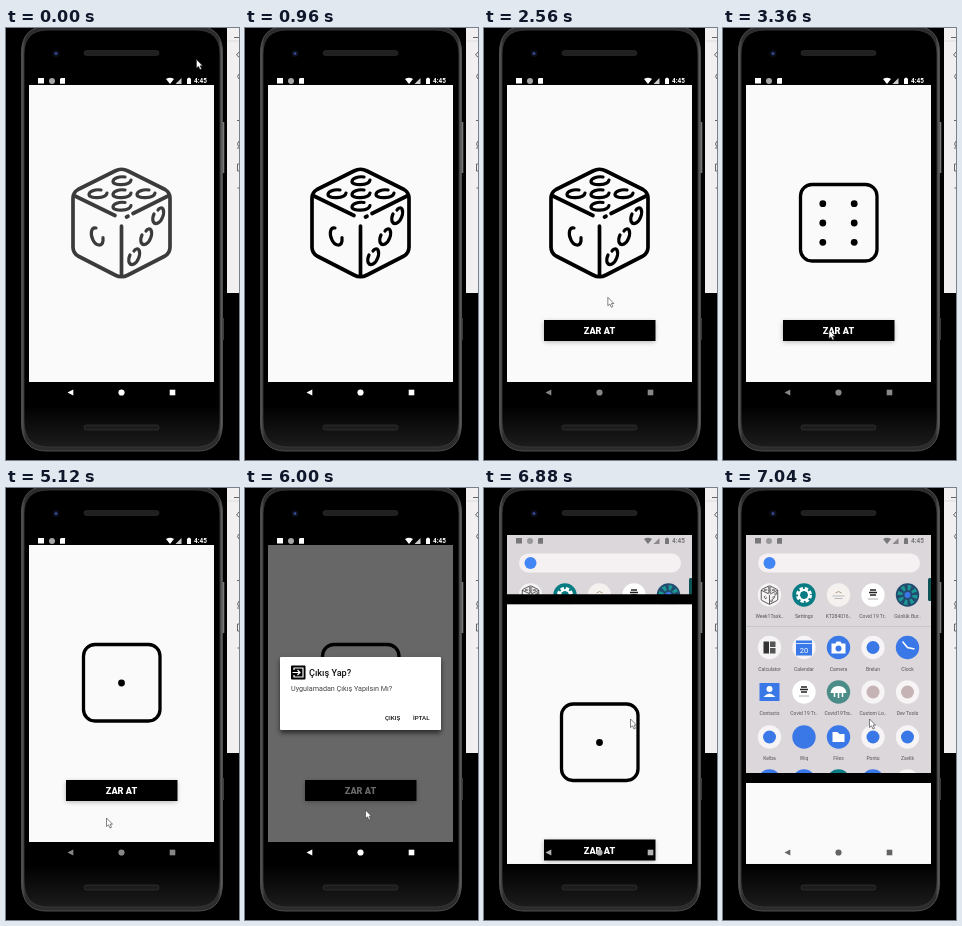
These frames come from a looping animation (233 px wide and 432 px high, 7120 ms). An HTML page:

```html
<!DOCTYPE html>
<html lang="tr">
<head>
<meta charset="utf-8">
<style>
html, body { margin: 0; width: 100%; height: 100%; overflow: hidden; background: #000; }
svg { display: block; width: 100%; height: 100%; font-family: Roboto, sans-serif; }
</style>
</head>
<body>
<svg viewBox="0 0 233 432">
  <defs>
    <clipPath id="screen"><rect x="23" y="47" width="185" height="328.700"/></clipPath>
    <filter id="soft" x="-20%" y="-20%" width="140%" height="150%"><feGaussianBlur stdDeviation="2.5"/></filter>
    <linearGradient id="edge">
      <stop offset="0" stop-color="#5c5c5c"/><stop offset=".02" stop-color="#2c2c2c"/>
      <stop offset=".98" stop-color="#2c2c2c"/><stop offset="1" stop-color="#6a6a6a"/>
    </linearGradient>
    <linearGradient id="bezel" x2="0" y2="1">
      <stop offset=".9" stop-color="#000"/><stop offset="1" stop-color="#1c1c1c"/>
    </linearGradient>
    <g id="art" fill="none" stroke="#000" stroke-width="3.700" stroke-linecap="round" stroke-linejoin="round">
      <path d="M109 143Q115.500 139.500 122 143L159 161.500Q164 164.500 164 170V219Q164 225 159 228L122 247Q115.500 250.500 109 247L72 228Q67 225 67 219V170Q67 164.500 72 161.500Z"/>
      <path d="M69 168L109 187.500M162 168L127 185.500M120.500 189L122 188.300M115.500 198V247"/>
      <g id="pips" stroke-width="3.2"></g>
    </g>
    <path id="flat" d="M3-4C-3-5-9-2.500-9 .5C-9 5 8 5 9-1"/>
    <path id="side" d="M-4-2C-7 5-4 9 0 7C4 5 7-3 5-7C4-9 1-8 0-6"/>
  </defs>

  <!-- phone -->
  <path d="M15.500 24Q16-2 42-2H190Q216-2 216.500 24V395Q216 423 192 423H40Q16 423 15.500 395Z" fill="url(#edge)" stroke="#4c4c4c"/>
  <path d="M18 26Q18 2 42 2H190Q214 2 214 26V393Q214 419 190 419H42Q18 419 18 393Z" fill="url(#bezel)" stroke="#3a3a3a" stroke-width=".8"/>
  <rect x="216.500" y="94" width="1.800" height="51" fill="#777"/>
  <rect x="216.500" y="290" width="1.500" height="22" fill="#3a3a3a"/>
  <rect x="78" y="22.500" width="75" height="5" rx="2.500" fill="#202020" stroke="#303030" stroke-width=".6"/>
  <rect x="78" y="397" width="75" height="5" rx="2.500" fill="#1c1c1c" stroke="#3c3c3c" stroke-width=".6"/>
  <circle cx="50" cy="25.500" r="3.600" fill="#0b0d18"/>
  <circle cx="50" cy="25.500" r="1.500" fill="#34488e"/>

  <!-- window at the right edge -->
  <path d="M221 0H233V265H221Z" fill="#f1efef"/>
  <path d="M221 13H233" stroke="#ddd"/>
  <g stroke="#666" fill="none">
    <path d="M228 9.500H233M233 24L230.500 27L233 29M233 46Q230 48 233 51M231 92.500H233M233 136H231.500V143H233M231.500 160H233"/>
    <path d="M233 113Q230 116 233 119M231 120H233"/>
  </g>

  <g clip-path="url(#screen)">
    <g id="home">
      <rect x="23" y="47" width="186" height="329" fill="#dbd7db"/>
      <rect x="35" y="65.500" width="162" height="19" rx="9.500" fill="#f5f1f2"/>
      <circle cx="46.500" cy="75" r="6" fill="#4285f4"/>
      <path d="M23 138.500H208" stroke="#c6c2c6" stroke-width=".8"/>
      <g id="icons" font-size="5" fill="#555" text-anchor="middle"></g>
      <rect x="205" y="90" width="5" height="23" rx="1.500" fill="#0f5356"/>
    </g>
    <g id="app">
      <g id="splash">
        <path d="M23 47H209V57H23Z"/>
        <path d="M23 57H209V354H23Z" fill="#fafafa"/>
        <use id="logo" href="#art"/>
      </g>
      <g id="main">
        <path d="M23 47H209V57H23Z"/>
        <path d="M23 57H209V354H23Z" fill="#fafafa"/>
        <use id="mainArt" href="#art"/>
        <g id="face">
          <rect x="77.500" y="156.500" width="76.500" height="76.500" rx="11.500" fill="none" stroke="#000" stroke-width="3.300"/>
          <g id="dots"></g>
        </g>
        <rect x="60" y="293.500" width="111" height="20.500" filter="url(#soft)" opacity=".28"/>
        <rect x="60" y="292" width="111.500" height="21"/>
        <rect id="ripple" x="60" y="292" width="111.500" height="21" fill="#fff"/>
        <text x="115.500" y="306" font-size="9.100" font-weight="800" fill="#fff" text-anchor="middle">ZAR AT</text>
      </g>
      <rect id="dim" x="23" y="57" width="186" height="297"/>
      <g id="dialog">
        <rect x="35" y="172" width="161" height="73" filter="url(#soft)" opacity=".6"/>
        <rect x="35" y="169" width="161" height="73" rx="1" fill="#fff"/>
        <rect x="46" y="177.500" width="14.500" height="14" rx="1"/>
        <path d="M49 182V180H58V189H49V187M47.500 184.500H55M52.500 182L55 184.500L52.500 187" fill="none" stroke="#fff" stroke-width="1.200"/>
        <text x="64" y="188" font-size="9.100" font-weight="500" fill="#111">Çıkış Yap?</text>
        <text x="46" y="203" font-size="7.200" fill="#444">Uygulamadan Çıkış Yapılsın Mı?</text>
        <rect id="exitRipple" x="135" y="221" width="26" height="17" rx="1"/>
        <g font-size="6.200" font-weight="500" fill="#111">
          <text x="140" y="232">ÇIKIŞ</text><text x="168" y="232">İPTAL</text>
        </g>
      </g>
    </g>
    <g id="status">
      <rect x="32" y="50" width="6" height="5.500"/>
      <circle cx="46" cy="53" r="3" opacity=".65"/>
      <path d="M55 50H59V55.800H54V51Z"/>
      <path d="M160 51Q164 48.500 168 51L164 56Z"/>
      <path d="M175.500 50V56H169.500Z" opacity=".8"/>
      <path d="M181 50.500H182V49.800H184V50.500H185V56H181Z"/>
      <text x="188" y="55.200" font-size="6.400" font-weight="700">4:45</text>
    </g>
  </g>
  <circle id="backRipple" cx="64.500" cy="364.500" r="11" fill="#fff"/>
  <g id="nav">
    <path d="M61.500 364.500L67.300 361.500V367.500Z"/><circle cx="115.500" cy="364.500" r="3.100"/>
    <rect x="163.700" y="361.700" width="5.600" height="5.600"/>
  </g>
  <path id="cursor" d="M0 0V8.500L2 6.800L3.500 10L5 9.300L3.600 6.200H6Z" fill="#fff" stroke="#333" stroke-width=".6"/>
</svg>
<script>
const $ = id => document.getElementById(id);
const set = (id, name, value) => $(id).setAttribute(name, value);
const alpha = (id, value) => set(id, 'opacity', value);
const clamp = v => Math.max(0, Math.min(1, v));
const ramp = (t, from, to) => clamp((t - from) / (to - from));
const pulse = (t, start, length) => Math.sin(Math.PI * ramp(t, start, start + length));
const LOOP = 7120, STEP = 80;

// line-art die
$('pips').innerHTML =
  [[116, 153], [92, 166], [116, 166], [140, 166], [116, 178.5]]
    .map(([x, y]) => `<use href="#flat" x="${x}" y="${y}"/>`).join('') +
  [[152, 188], [140, 209], [128, 229]]
    .map(([x, y]) => `<use href="#side" x="${x}" y="${y}"/>`).join('') +
  '<path d="M90 200C85 199 84 206 87 212C90 218 96 219 97 213V209.500"/>';

// launcher icons, drawn around 0,0
const BLUE = '#3b78e7', TEAL = '#087b83', PALE = '#f6f4f4';
const disc = (fill, inner = '') => `<circle r="11.700" fill="${fill}"/>${inner}`;
const line = (d, color = '#fff', w = 1.5) => `<path d="${d}" fill="none" stroke="${color}" stroke-width="${w}"/>`;
const shape = (d, color = '#fff') => `<path d="${d}" fill="${color}"/>`;
const mark = color => disc(PALE, `<circle r="6.500" fill="${color}"/>`);
const die = disc(PALE, '<use href="#art" transform="scale(.17) translate(-115.500 -195)"/>');
const gear = disc(TEAL, '<circle r="6" fill="none" stroke="#fff" stroke-width="4" stroke-dasharray="3 1.710"/><circle r="5" fill="none" stroke="#fff" stroke-width="2"/>');
const card = disc('#f4f1ee', line('M-6 1H6M-4 3.500H4', '#aaa', .8) + line('M-3-2Q0-5 3-2', '#b49a80', 1));
const virus = disc('#fff', line('M-3-5H3M-4-2.500H4M-3 0H3', '#222', 1.6) + line('M-5 4H5', '#999', .8));
const flower = disc('#234b70', '<circle r="7.500" fill="none" stroke="#1a9a94" stroke-width="5" stroke-dasharray="3 2.890"/><circle r="3" fill="#3b78e7"/>');
const calc = disc(PALE, shape('M-6-6H-.5V6H-6Z', '#333') + shape('M.5-6H6V-.5H.5ZM.5 .5H6V6H.5Z', '#555'));
const calendar = disc(PALE, shape('M-8-7H8V8H-8Z', BLUE) + line('M-8-4H8', '#cfe0ff', 1) + '<text y="5" font-size="7.500" fill="#fff">20</text>');
const camera = disc(BLUE, shape('M-7-4H-3L-2-6H2L3-4H7V6H-7Z') + `<circle cy="1" r="3" fill="${BLUE}"/>`);
const clock = disc(BLUE, line('M-5-6L0 0L7 1.500'));
const contacts = shape('M-10-9H10V9H-10Z', BLUE) + '<circle cy="-3" r="3" fill="#fff"/>' + shape('M-6 5Q0-2 6 5Z');
const dome = disc('#4c8c88', shape('M-8 1Q-7-6 0-6Q7-6 8 1Z') + line('M-4 1V5M0 1V6M4 1V5'));
const folder = disc(BLUE, shape('M-6-5H-1L1-3H6V5H-6Z'));
const plain = mark('#c5b3b5'), logo = mark(BLUE), blue = disc(BLUE);
const rows = [
  [107, [[die, 'Week1Task..'], [gear, 'Settings'], [card, 'KT284016..'], [virus, 'Covid 19 Tr..'], [flower, 'Günlük Bur..']]],
  [159.5, [[calc, 'Calculator'], [calendar, 'Calendar'], [camera, 'Camera'], [logo, 'Brelun'], [clock, 'Clock']]],
  [204, [[contacts, 'Contacts'], [virus, 'Covid 19 Tr..'], [dome, 'Covid19Tra..'], [plain, 'Custom Lo..'], [plain, 'Dev Tools']]],
  [249, [[logo, 'Kelba'], [blue, 'Wiq'], [folder, 'Files'], [logo, 'Pontu'], [logo, 'Zavlik']]],
  [293, [[blue, ''], [blue, ''], [disc(TEAL), ''], [blue, ''], [plain, '']]]
];
$('icons').innerHTML = rows.map(([y, cells]) => cells.map(([icon, label], i) =>
  `<g transform="translate(${46.5 + i * 34.5} ${y})">${icon}<text y="23">${label}</text></g>`).join('')).join('');

const faces = {
  1: [[0, 0]],
  3: [[-1, -1], [0, 0], [1, 1]],
  6: [[-1, -1], [-1, 0], [-1, 1], [1, -1], [1, 0], [1, 1]]
};
function showFace(n) {
  $('dots').innerHTML = faces[n].map(([x, y]) =>
    `<circle cx="${115.5 + x * 15.7}" cy="${195 + y * 19.3}" r="3.400"/>`).join('');
}

// time, x, y
const path = [
  [0, 190.5, 31.5], [80, 191, 31], [400, 238, 12], [2160, 238, 60], [2680, 106, 302],
  [5040, 106, 302], [5120, 100.5, 330], [5440, 64, 363], [5760, 64, 363],
  [6000, 120.5, 322], [6400, 146.5, 231], [LOOP, 146.5, 231]
];
function pointer(t) {
  const i = path.findIndex(k => k[0] > t);
  const [t0, x0, y0] = path[i - 1], [t1, x1, y1] = path[i];
  const p = ramp(t, t0, t1), e = p * p * (3 - 2 * p);
  return [x0 + (x1 - x0) * e, y0 + (y1 - y0) * e];
}

function navShade(t) {
  if (t < 5440) return 255 - 120 * ramp(t, 1120, 1520);
  return 255 - 155 * ramp(t, 6720, 7040);
}

function draw(t) {
  // splash to main
  const enter = ramp(t, 2000, 2160);
  alpha('logo', .76 + .24 * ramp(t, 0, 240));
  alpha('main', t < 2000 ? 0 : .82 + .18 * enter);
  set('main', 'transform', `translate(0 ${8 * (1 - enter) ** 1.5})`);

  // rolls
  const rolled = t >= 2880;
  alpha('mainArt', rolled ? 0 : 1);
  alpha('face', rolled ? 1 : 0);
  showFace(t < 3840 ? 6 : t < 4560 ? 3 : 1);
  alpha('ripple', .22 * (pulse(t, 2720, 640) + pulse(t, 3760, 400) + pulse(t, 4480, 240)));

  // exit dialog
  alpha('backRipple', .3 * pulse(t, 5400, 400));
  const open = ramp(t, 5760, 6000);
  alpha('dialog', t < 6720 ? open : 0);
  alpha('dim', .59 * open * (1 - ramp(t, 6720, 6880)));
  alpha('exitRipple', .15 * pulse(t, 6320, 240));

  // app slides away over the launcher
  const leave = ramp(t, 6720, 7040);
  alpha('home', leave > 0 ? 1 : 0);
  set('app', 'transform', `translate(0 ${238 * leave * leave})`);
  set('status', 'fill', leave > 0 ? '#777' : '#fff');
  const shade = Math.round(navShade(t));
  set('nav', 'fill', `rgb(${shade},${shade},${shade})`);

  set('cursor', 'transform', `translate(${pointer(t).join(' ')})`);
}

function tick() {
  draw(Math.floor(performance.now() % LOOP / STEP) * STEP);
  requestAnimationFrame(tick);
}
tick();
</script>
</body>
</html>
```
